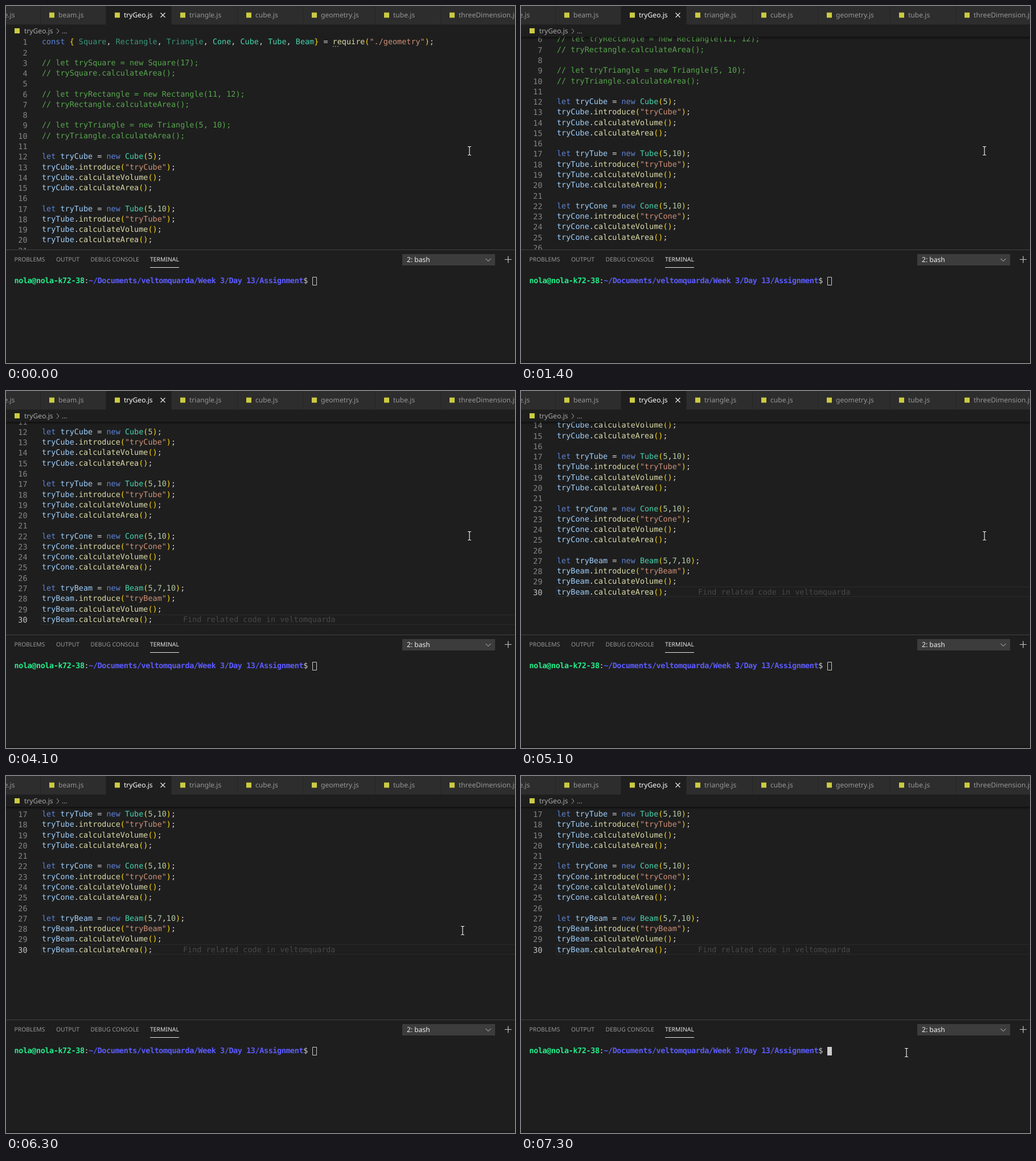
Recreate the animation shown at these times as an HTML page with a canvas. Size 894 px wide and 626 px high, loop 8000 ms.

```html
<!DOCTYPE html>
<html lang="en">
<head>
<meta charset="utf-8">
<title>Editor scroll</title>
<style>
html, body { margin: 0; width: 100%; height: 100%; overflow: hidden; background: #1e1e1e; }
canvas { display: block; }
</style>
</head>
<body>
<canvas id="stage" width="894" height="626"></canvas>
<script>
const ctx = document.getElementById('stage').getContext('2d');
const LOOP = 8000, W = 894;
const CHAR = 8.105, LINE = 18.27, NOTCH = 48.08;
const EDITOR = { x: 63, top: 54, bottom: 427 };
const MONO = '13.46px "DejaVu Sans Mono", monospace';
const UI = '"Noto Sans", "Open Sans", sans-serif';
const BG = '#1e1e1e', ICON = '#cbcb41', PROJECT = 'veltomquarda';

const SCROLL_TIMES = [500, 1400, 2300, 4100, 5100, 5200];
const POINTER = [[0, 814, 254], [6300, 802, 271], [6400, 768, 325], [6500, 726, 396],
  [6600, 692, 452], [6700, 677, 474.5], [7000, 677, 480], [7100, 677, 485]];
const FOCUS_TIME = 7300;

const solid = (name, args) => [`let try${name} = new ${name}(${args});`, `try${name}.introduce("try${name}");`,
  `try${name}.calculateVolume();`, `try${name}.calculateArea();`, ''];
const flat = (name, args) => [`// let try${name} = new ${name}(${args});`, `// try${name}.calculateArea();`, ''];
const code = [
  'const { Square, Rectangle, Triangle, Cone, Cube, Tube, Beam} = require("./geometry");', '',
  ...flat('Square', '17'), ...flat('Rectangle', '11, 12'), ...flat('Triangle', '5, 10'),
  ...solid('Cube', '5'), ...solid('Tube', '5,10'), ...solid('Cone', '5,10'), ...solid('Beam', '5,7,10'),
].slice(0, 30);

// First matching rule wins at each position.
const RULES = [
  [/^\/\/.*/, '#58a74e'],
  [/^"[^"]*"/, '#ce9178'],
  [/^(const|let|new)\b/, '#5f83d8'],
  [/^(Square|Rectangle|Triangle)\b/, '#3a967b'],
  [/^[A-Z]\w*/, '#48d4ae'],
  [/^\d+/, '#b5cea8'],
  [/^\w+(?=\()/, '#dcdcaa'],
  [/^\w+/, '#9fcffb'],
  [/^[(){}]/, '#ffd70a'],
  [/^./, '#d4d4d4'],
];
function tokenize(line) {
  const tokens = [];
  for (let col = 0; col < line.length;) {
    const rest = line.slice(col);
    const [pattern, color] = RULES.find(([p]) => p.test(rest));
    const text = rest.match(pattern)[0];
    tokens.push({ col, text, color });
    col += text.length;
  }
  return tokens;
}
const lines = code.map(tokenize);

function rect(x, y, w, h, color) {
  ctx.fillStyle = color;
  ctx.fillRect(x, y, w, h);
}
function label(text, x, y, color, size = 12.1) {
  ctx.font = `${size}px ${UI}`;
  ctx.fillStyle = color;
  ctx.fillText(text, x, y);
}
function grid(text, x, y, color, step = CHAR) {
  ctx.fillStyle = color;
  [...text].forEach((c, i) => c !== ' ' && ctx.fillText(c, x + i * step, y));
}
function stroke(path, color, width = 1) {
  ctx.strokeStyle = color;
  ctx.lineWidth = width;
  ctx.stroke(new Path2D(path));
}

function drawEditor(scroll) {
  const { x, top, bottom } = EDITOR;
  ctx.save();
  ctx.beginPath();
  ctx.rect(0, top, W, bottom - top);
  ctx.clip();
  ctx.font = MONO;
  lines.forEach((tokens, i) => {
    const y = top - scroll + i * LINE, base = y + 13.3;
    if (y < top - LINE || y > bottom) return;
    const last = i === lines.length - 1, num = String(i + 1);
    if (last) {
      ctx.strokeStyle = '#2b2b2b';
      ctx.lineWidth = 1;
      ctx.strokeRect(x - .5, Math.round(y) + .5, W, 17);
      grid('Find related code in ' + PROJECT, 311, base, '#484848');
    }
    grid(num, 37.5 - num.length * CHAR, base + 1, last ? '#c6c6c6' : '#858585');
    tokens.forEach(t => grid(t.text, x + t.col * CHAR, base, t.color));
    if (i === 0) for (const dx of [0, 4, 8]) rect(574 + dx, y + 16, 1.5, 1.5, '#a0a0a0');
  });
  if (scroll === 0) {
    // The line after the visible block peeks out at the bottom edge.
  } else {
    const shade = ctx.createLinearGradient(0, top, 0, top + 5);
    shade.addColorStop(0, 'rgba(0,0,0,.5)');
    shade.addColorStop(1, 'rgba(0,0,0,0)');
    rect(0, top, W, 5, shade);
  }
  ctx.restore();
}

function drawTabs() {
  rect(0, 0, W, 32.5, '#2d2d2d');
  label('e.js', -3.5, 20, '#969696');
  const tabs = { beam: 92, tryGeo: 207, triangle: 322, cube: 438, geometry: 553, tube: 680, threeDimension: 795 };
  for (const [name, x] of Object.entries(tabs)) {
    const active = name === 'tryGeo';
    rect(x - 32, 0, 1, 32.5, '#252526');
    if (active) rect(x - 31, 0, 115, 33, BG);
    rect(x - 16, 11.5, 9, 9, ICON);
    label(name + '.js', x, 20, active ? '#fff' : '#969696');
  }
  stroke('M271.5 12l8 8m0-8l-8 8', '#e8e8e8', 1.2);
  rect(15, 39, 9, 9, ICON);
  label('tryGeo.js', 32, 48, '#a9a9a9');
  stroke('M89 39.5l4 4.5l-4 4.5', '#a9a9a9');
  label('…', 98, 48, '#a9a9a9');
}

function drawPanel(focused) {
  rect(0, 427, W, 1, '#414141');
  rect(0, 622, W, 4, '#191919');
  const titles = { PROBLEMS: 14.5, OUTPUT: 88, 'DEBUG CONSOLE': 148.5, TERMINAL: 253 };
  for (const [title, x] of Object.entries(titles))
    label(title, x, 448, title === 'TERMINAL' ? '#e7e7e7' : '#979797', 10.4);
  rect(253, 458, 51, 1, '#e7e7e7');
  rect(696, 435, 163, 20, '#3c3c3c');
  label('2: bash', 704, 449, '#f0f0f0');
  stroke('M842.5 443l4.5 4.5l4.5-4.5', '#c5c5c5');
  stroke('M876 444.5h12M882 438.5v12', '#c5c5c5', 1.2);

  const step = 7.692;
  const prompt = [['nola@nola-k72-38', '#23ee8c', 'bold '], [':', '#cccccc', ''],
    [`~/Documents/${PROJECT}/Week 3/Day 13/Assignment`, '#5c5cff', 'bold '], ['$', '#cccccc', '']];
  let x = 14.5;
  for (const [text, color, weight] of prompt) {
    ctx.font = weight + MONO;
    grid(text, x, 486.3, color, step);
    x += text.length * step;
  }
  if (focused) rect(538, 475, 8, 15, '#cccccc');
  else stroke('M538.5 475.5h7v14h-7z', '#cccccc');
}

function drawPointer([, x, y]) {
  ctx.save();
  ctx.translate(x, y);
  const beam = 'M-3-7.5h2l1 1l1-1h2M-3 7.5h2l1-1l1 1h2M0-6.5v13';
  stroke(beam, '#111', 2.4);
  stroke(beam, '#f4f4f4', 1.2);
  ctx.restore();
}

function draw(now) {
  const t = now % LOOP;
  ctx.textRendering = 'geometricPrecision';
  rect(0, 0, W, 626, BG);
  drawEditor(SCROLL_TIMES.filter(s => s <= t).length * NOTCH);
  drawTabs();
  drawPanel(t >= FOCUS_TIME);
  drawPointer(POINTER.filter(p => p[0] <= t).pop());
  requestAnimationFrame(() => draw(performance.now()));
}
draw(performance.now());
</script>
</body>
</html>
```
